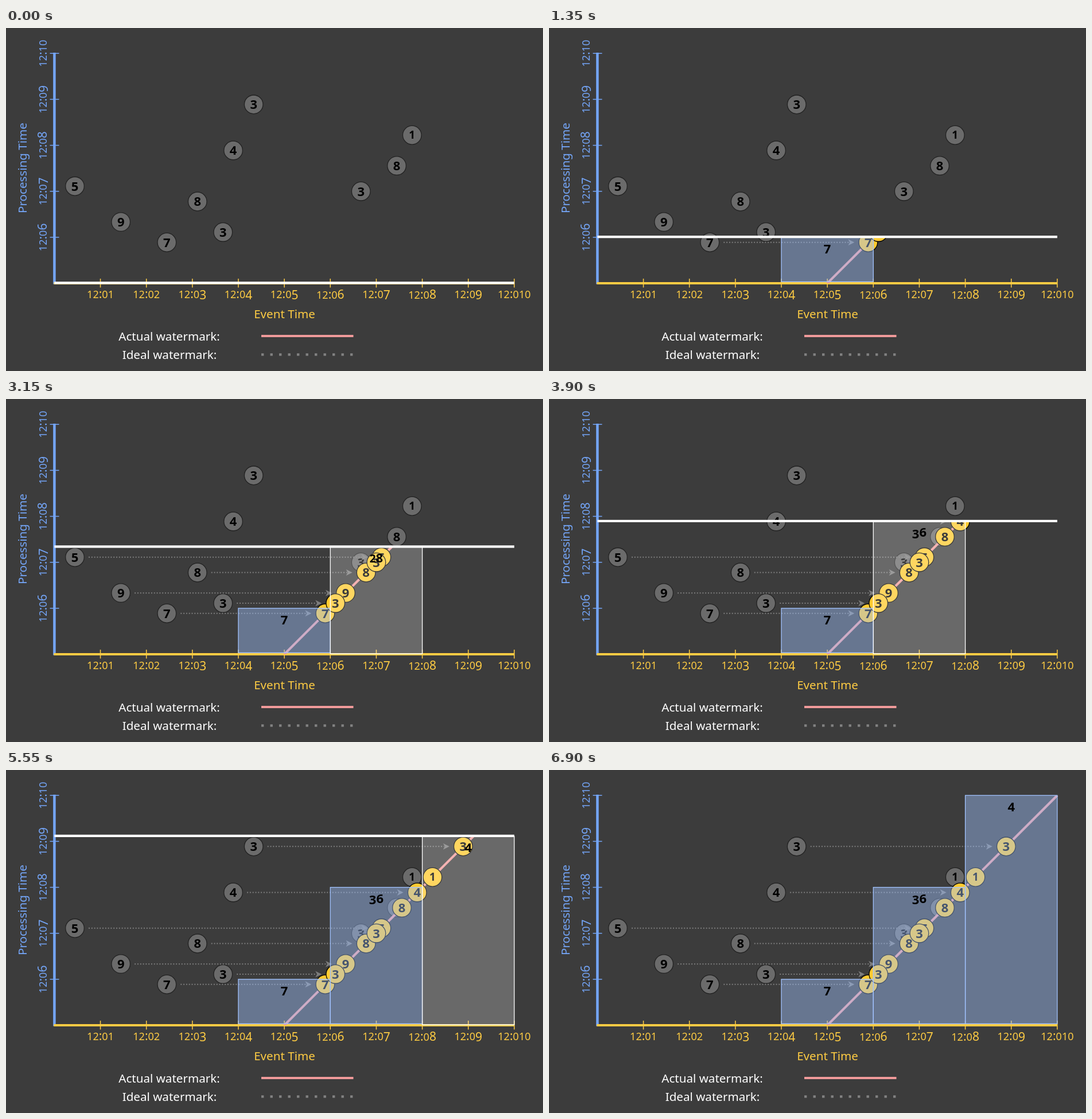
Animation, 936 px wide and 598 px high, one loop 9.9 s. Source, as an HTML page:

```html
<!DOCTYPE html>
<html lang="en">
<head>
<meta charset="utf-8">
<title>Watermark windows</title>
<style>
  html, body { margin: 0; width: 100%; height: 100%; overflow: hidden; background: #3c3c3c; }
  svg { display: block; width: 936px; height: 598px; }
  text { font: 20.6px "Noto Sans", "Open Sans", sans-serif; text-anchor: middle; }
  .bold { font-weight: 700; font-size: 22px; }
</style>
</head>
<body>
<svg id="stage" viewBox="0 0 936 598"></svg>
<script>
const STEP_MS = 150, LOOP_MS = 9900, LAST = 46;
const UNIT = 80.15 / 9;                 // one step; nine steps make a minute
const X = k => 84.4 + k * UNIT;
const Y = k => 445 - k * UNIT;
const BLUE = '#74a5f7', YELLOW = '#fdcb43', PINK = '#f09a9a';
const TICK_SIZE = 21, NUMBER_SIZE = 22, SHORT = .86;

// event step, processing step, value
const events = [
  [4, 19, 5], [13, 12, 9], [22, 8, 7], [28, 16, 8], [33, 10, 3],
  [35, 26, 4], [39, 35, 3], [60, 18, 3], [67, 23, 8], [70, 29, 1]
];
// totals: [step, value shown from then on]
const windows = [
  { start: 36, close: 9, totals: [[8, 7]] },
  { start: 54, close: 27, totals: [[10, 3], [12, 12], [16, 20], [18, 23], [19, 28], [23, 36]] },
  { start: 72, close: 45, totals: [[29, 1], [35, 4]] }
];

const stage = document.getElementById('stage');

function add(parent, tag, attrs = {}, content = '') {
  const node = document.createElementNS('http://www.w3.org/2000/svg', tag);
  set(node, attrs);
  node.innerHTML = content;
  parent.append(node);
  return node;
}
function set(node, attrs) {
  for (const key in attrs) node.setAttribute(key, attrs[key]);
}
function line(parent, x1, y1, x2, y2, stroke, width, extra = {}) {
  return add(parent, 'line', { x1, y1, x2, y2, stroke, 'stroke-width': width, ...extra });
}

// Old-style figures: 0-2 are short, 3 4 5 7 9 hang below the baseline.
const isShort = c => '012'.includes(c);
function figures(value, size) {
  let shift = 0;
  return [...value].map(c => {
    const drop = '34579'.includes(c) ? size * .1 : 0;
    const dy = drop - shift;
    shift = drop;
    return `<tspan dy="${dy}" style="font-size:${isShort(c) ? size * SHORT : size}px">${c}</tspan>`;
  }).join('');
}
function setNumber(node, value, x, y) {
  const s = String(value), single = s.length === 1;
  const size = single && isShort(s) ? NUMBER_SIZE * SHORT : NUMBER_SIZE;
  set(node, { x, y: y + (single ? size * .357 : 7) });
  if (node.dataset.value === s) return;
  node.dataset.value = s;
  node.innerHTML = single ? `<tspan style="font-size:${size}px">${s}</tspan>` : figures(s, size);
}
function dot(parent, x, y, value, fill, stroke) {
  add(parent, 'circle', { cx: x, cy: y, r: 16.3, fill, stroke, 'stroke-width': 1.3 });
  setNumber(add(parent, 'text', { class: 'bold' }), value, x, y);
}
function upright(x, y, content) {
  add(stage, 'text', { transform: `translate(${x} ${y}) rotate(-90)`, fill: BLUE }, content);
}

// Axes
line(stage, X(0), 43, X(0), 446.5, BLUE, 4.5);
line(stage, X(0) - 1, 445, X(90), 445, YELLOW, 4);
for (let m = 1; m <= 10; m++) {
  const x = X(m * 9);
  line(stage, x, 437, x, 452.5, YELLOW, 1.5);
  add(stage, 'text', { x, y: m === 6 || m === 8 ? 472 : 471, fill: YELLOW }, figures('12:0' + m, TICK_SIZE));
}
for (let m = 6; m <= 10; m++) {
  const y = Y((m - 5) * 9);
  line(stage, 76.5, y, 92.5, y, BLUE, 1.5);
  upright(71, y, figures('12:' + String(m).padStart(2, '0'), TICK_SIZE));
}
upright(36.3, 244, 'Processing Time');
add(stage, 'text', { x: 485.5, y: 506, fill: YELLOW }, 'Event Time');

// Legend
add(stage, 'text', { x: 284.5, y: 544.7, fill: '#fff' }, 'Actual watermark:');
add(stage, 'text', { x: 285, y: 576.5, fill: '#fff' }, 'Ideal watermark:');
line(stage, 445, 537, 605.5, 537, PINK, 4.2);
line(stage, 445, 569.3, 605.5, 569.3, '#828282', 4.2, { 'stroke-dasharray': '4.4 11.1' });

// Waiting events, then everything revealed below the moving line
for (const [e, p, value] of events) dot(stage, X(e), Y(p), value, '#6b6b6b', '#222');

const clip = add(add(stage, 'clipPath', { id: 'past' }), 'rect', { x: 0, width: 936 });
const past = add(stage, 'g', { 'clip-path': 'url(#past)' });
line(past, X(45), Y(0), X(90), Y(45), PINK, 4.2);
for (const [e, p] of events) {
  if (45 + p - e < 6) continue;
  const tip = X(45 + p) - 24, y = Y(p);
  line(past, X(e) + 24, y, tip - 9, y, '#7d7d7d', 2, { 'stroke-dasharray': '2 2.8' });
  add(past, 'path', { d: `M${tip} ${y}l-11 -5.5 3 5.5 -3 5.5z`, fill: '#7d7d7d' });
}
for (const [, p, value] of events) dot(past, X(45 + p), Y(p), value, '#ffca30', '#000');

for (const w of windows) w.box = add(stage, 'rect', { x: X(w.start), width: 18 * UNIT });
for (const w of windows) w.label = add(stage, 'text', { class: 'bold' });
const now = line(stage, X(0), 0, X(90), 0, '#fff', 4.2);

function draw(step) {
  const y = Y(Math.min(step, 45));
  set(clip, { y, height: 445 - y });
  set(now, { y1: y - .7, y2: y - .7, visibility: step < LAST ? 'visible' : 'hidden' });

  for (const w of windows) {
    const total = w.totals.filter(([from]) => from <= step).pop();
    const visibility = total ? 'visible' : 'hidden';
    set(w.box, { visibility });
    set(w.label, { visibility });
    if (!total) continue;
    const closed = step >= w.close;
    const color = closed ? '#a1c3ff' : '#fff';
    const top = Y(Math.min(step, w.close));
    set(w.box, {
      y: top,
      height: (closed ? 442.4 : 444.3) - top,
      fill: color,
      'fill-opacity': closed ? .43 : .23,
      stroke: color,
      'stroke-width': 1.3
    });
    setNumber(w.label, total[1], X(w.start + 9), top + 20);
  }
}

const begin = performance.now();
function tick() {
  const t = (performance.now() - begin) % LOOP_MS;
  draw(Math.min(LAST, Math.floor(t / STEP_MS)));
  requestAnimationFrame(tick);
}
tick();
</script>
</body>
</html>
```
